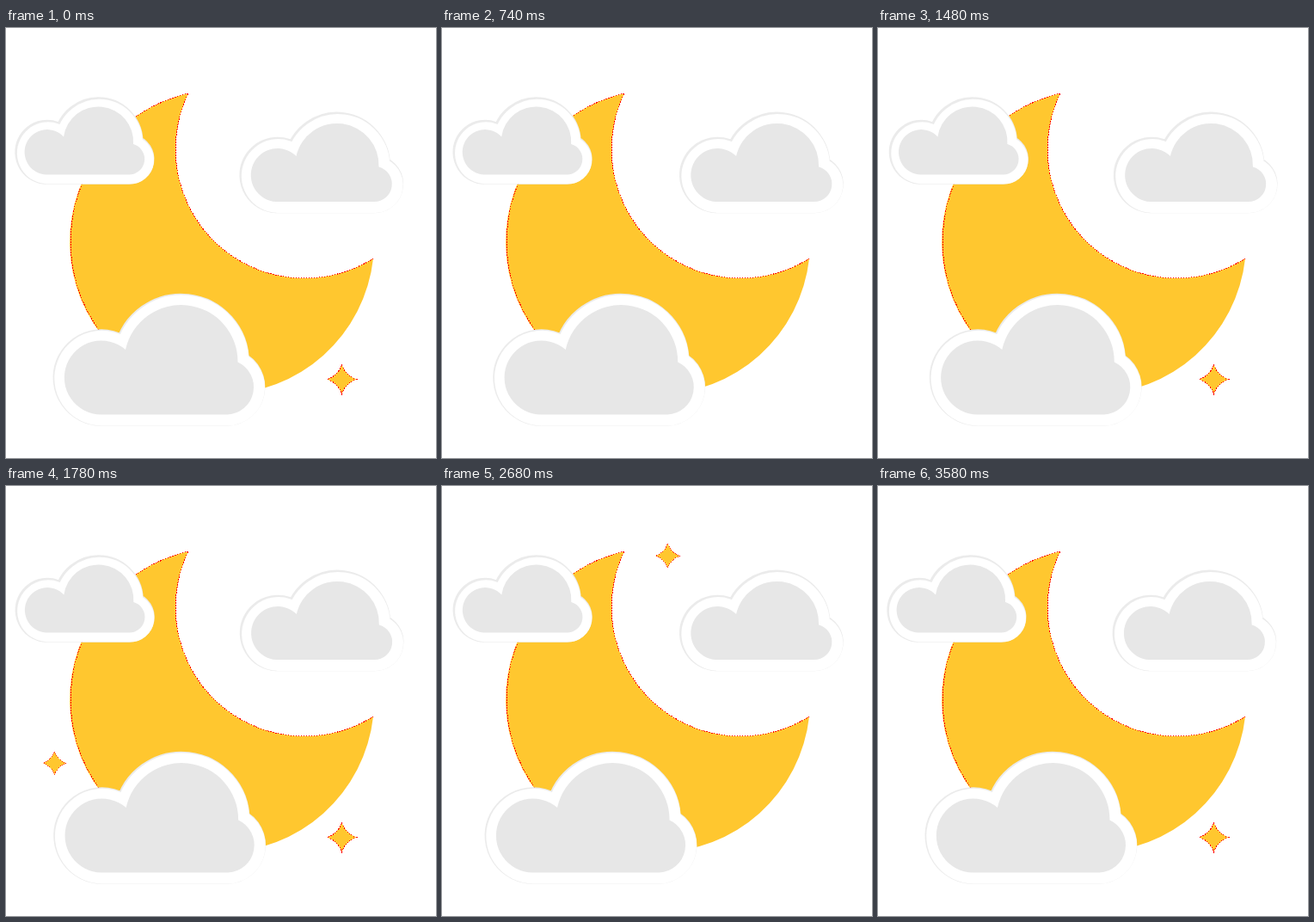
An HTML page that plays this animation: 500x500 px, repeating every 3.6 s.

```html
<!DOCTYPE html>
<html lang="en">
<head>
<meta charset="utf-8">
<title>Moon and clouds</title>
<style>
  html, body { margin: 0; width: 100%; height: 100%; overflow: hidden; background: #fff; }
  svg { display: block; width: 100vw; height: 100vh; }
  .gold { fill: #ffc72f; }
  .fringe { fill: none; stroke: #f00; stroke-dasharray: 1.5 1.5; shape-rendering: crispEdges; }
  .rim { fill: #ebebeb; stroke: #ebebeb; }
  .edge { fill: #fff; stroke: #fff; }
  .body { fill: #e7e7e7; }
</style>
</head>
<body>
<svg viewBox="0 0 500 500">
  <defs>
    <path id="front" d="M110.5 449.5A43 43 0 1 1 139 374A66 66 0 0 1 269.5 388.5A32 32 0 0 1 257.5 449.5Z"/>
    <path id="left" d="M47 170.5A26.2 26.2 0 1 1 67 126.5A40.75 40.75 0 0 1 148 135A18.1 18.1 0 0 1 142.5 170.5Z"/>
    <path id="right" d="M314 202A31 31 0 1 1 337.5 149A48.6 48.6 0 0 1 433.5 161.5A20.6 20.6 0 0 1 428 202Z"/>
    <path id="spark" d="M0 -17Q4.5 -4.5 17 0Q4.5 4.5 0 17Q-4.5 4.5 -17 0Q-4.5 -4.5 0 -17Z"/>
  </defs>
  <path class="gold" d="M212 76A150 150 0 0 0 427 268A177 177 0 1 1 212 76Z"/>
  <path class="fringe" d="M108 351A177 177 0 0 1 212 76A150 150 0 0 0 427 268"/>
  <g id="sky"></g>
</svg>
<script>
const LOOP = 3600, HALF = 1900;
const sky = document.getElementById('sky');

const ease = p => p * p * (3 - 2 * p);

// Slow drift out until the peak, quick return by the end
const swell = (t, peak, end) => ease(t < peak ? t / peak : (end - t) / (end - peak));
const drift = t => t < HALF ? swell(t, 1250, HALF) : swell(t - HALF, 1270, LOOP - HALF);

// margin: white border, bevel: grey rim on its upper left
const clouds = [
  { id: 'front', margin: 13.3, bevel: 1, dx: t => 7.4 * drift(t) * (t < HALF ? 1 : -1) },
  { id: 'left', margin: 11.3, bevel: 1.5, dx: t => 3.4 * drift(t) },
  { id: 'right', margin: 13.3, bevel: 1.4, dx: t => 2.65 * (1 - Math.cos(2 * Math.PI * t / 1940)) }
];

// Each star lights up `count` times, every `period` ms, for `lit` ms
const stars = [
  { x: 390.5, y: 408.5, size: 1, start: -900, period: 1900, lit: 1360, count: 3 },
  { x: 262.5, y: 81.2, size: .83, start: 200, period: 800, lit: 400, count: 4 },
  { x: 56.5, y: 322.3, size: .79, start: 1500, period: 1500, lit: 500, count: 2 }
];

function add(parent, tag, attrs) {
  const el = document.createElementNS('http://www.w3.org/2000/svg', tag);
  for (const key in attrs) el.setAttribute(key, attrs[key]);
  return parent.appendChild(el);
}

for (const c of clouds) {
  const href = '#' + c.id, width = 2 * c.margin, b = c.bevel;
  c.el = add(sky, 'g', {});
  add(c.el, 'use', { href, class: 'rim', 'stroke-width': width });
  add(c.el, 'use', { href, class: 'edge', 'stroke-width': width - 2 * b, x: b * .7, y: b * .7 });
  add(c.el, 'use', { href, class: 'body' });
}

for (const s of stars) {
  s.el = add(sky, 'g', { transform: `translate(${s.x} ${s.y}) scale(${s.size})` });
  for (const name of ['gold', 'fringe']) add(s.el, 'use', { href: '#spark', class: name });
}

function isLit(s, t) {
  const since = t - s.start, turn = Math.floor(since / s.period);
  return turn >= 0 && turn < s.count && since - turn * s.period < s.lit;
}

function draw() {
  const t = performance.now() % LOOP;
  for (const c of clouds) c.el.setAttribute('transform', `translate(${c.dx(t).toFixed(2)} 0)`);
  for (const s of stars) s.el.setAttribute('visibility', isLit(s, t) ? 'visible' : 'hidden');
  requestAnimationFrame(draw);
}
draw();
</script>
</body>
</html>
```
